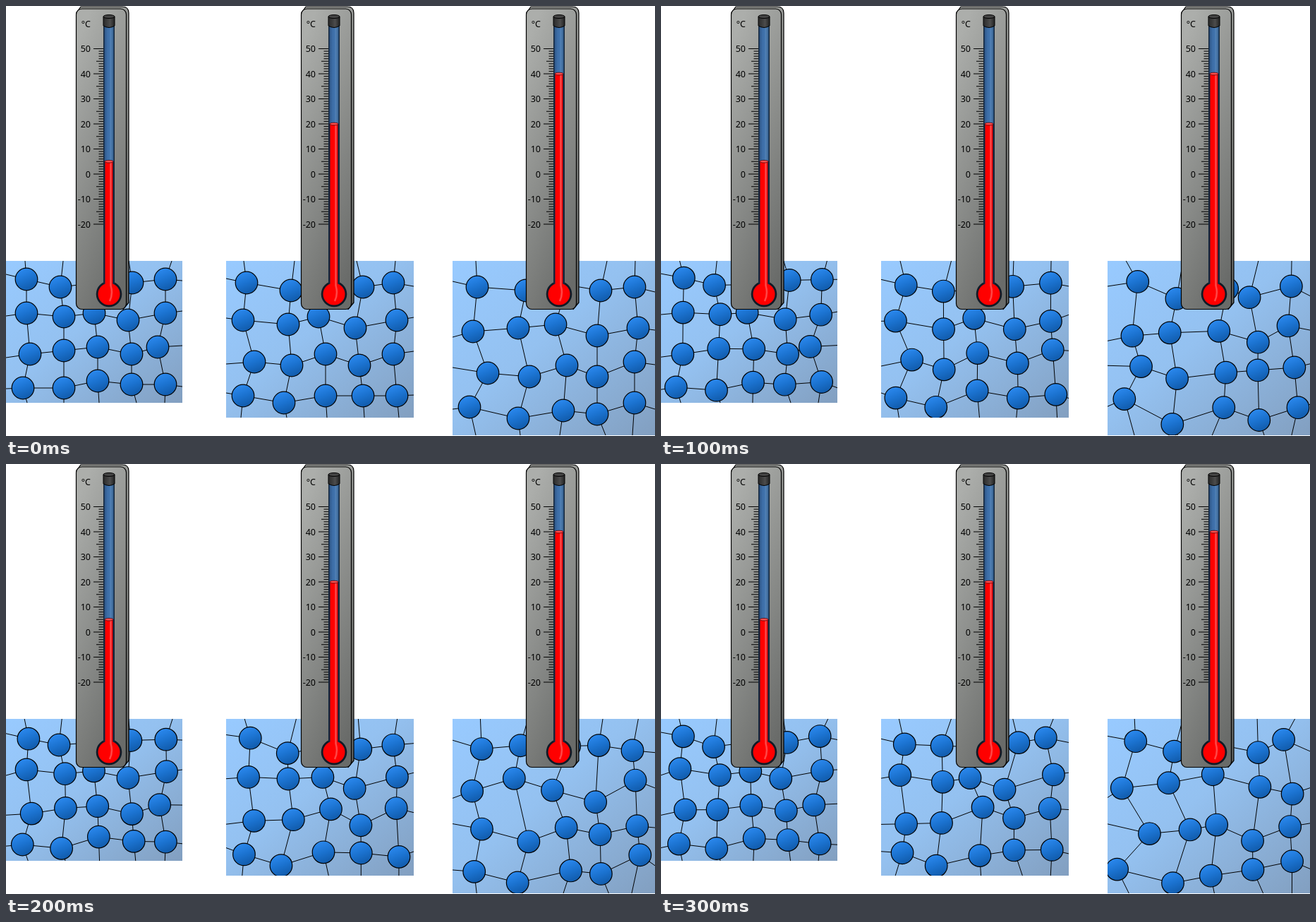
These frames come from a looping animation (920 px wide and 609 px high, 0.4 s). An HTML page:

```html
<!DOCTYPE html>
<html lang="en">
<head>
<meta charset="utf-8">
<title>Particle motion at three temperatures</title>
<style>
  html, body { margin: 0; width: 100%; height: 100%; overflow: hidden; background: #fff; }
  svg { display: block; width: 100%; height: 100%; }
  text { font: 12.5px "Noto Sans", "Open Sans", sans-serif; text-anchor: end; }
</style>
</head>
<body>
<svg id="stage" viewBox="0 0 920 609">
  <defs>
    <linearGradient id="water" x2="1" y2="1">
      <stop stop-color="#98caff"/><stop offset=".45" stop-color="#94c1f0"/><stop offset="1" stop-color="#829fc0"/>
    </linearGradient>
    <linearGradient id="ball" x1=".3" x2=".7" y2="1">
      <stop stop-color="#2c8af0"/><stop offset=".5" stop-color="#1b72cf"/><stop offset="1" stop-color="#1059a8"/>
    </linearGradient>
    <linearGradient id="plate" x1=".3" x2=".7" y2="1">
      <stop stop-color="#acaeab"/><stop offset="1" stop-color="#696b69"/>
    </linearGradient>
    <linearGradient id="side" x2="0" y2="1">
      <stop stop-color="#989a97"/><stop offset="1" stop-color="#5c5e5c"/>
    </linearGradient>
    <linearGradient id="glass">
      <stop stop-color="#2d5484"/><stop offset=".3" stop-color="#3c6ca5"/>
      <stop offset=".6" stop-color="#4174ae"/><stop offset=".65" stop-color="#5584b8"/><stop offset="1" stop-color="#34608f"/>
    </linearGradient>
    <linearGradient id="cap">
      <stop stop-color="#2a2a2a"/><stop offset=".6" stop-color="#4c4c4c"/><stop offset="1" stop-color="#222"/>
    </linearGradient>
  </defs>
</svg>
<script>
const COLS = 5, ROWS = 4, STEP = 100, POSES = 4, TOP = 361;
const stage = document.getElementById('stage');

// rest: x, y of each particle, row by row; edges: where the outer bonds leave the box
const boxes = [
  { x: 0, w: 250, h: 201, shake: 3.6, degrees: 5,
    rest: [29,387, 77,398, 128,392, 179,392, 226,387,
           29,435, 82,440, 125,435, 173,445, 226,435,
           34,493, 82,488, 130,483, 178,493, 215,483,
           24,541, 82,541, 130,531, 178,536, 226,536],
    edges: { top: [27, 81, 130, 174, 235], bottom: [30, 82, 132, 185, 225],
             left: [380, 439, 498, 542], right: [389, 432, 481, 539] } },
  { x: 312, w: 266, h: 222, shake: 8, degrees: 20,
    rest: [341,392, 404,403, 450,398, 506,398, 549,392,
           336,445, 400,451, 443,440, 495,456, 554,445,
           352,504, 405,509, 453,493, 501,509, 549,493,
           336,552, 394,562, 453,552, 506,552, 554,552],
    edges: { top: [337, 409, 450, 497, 552], bottom: [333, 398, 455, 508, 557],
             left: [386, 442, 507, 548], right: [397, 441, 489, 551] } },
  { x: 633, w: 287, h: 247, shake: 12, degrees: 40,
    rest: [668,398, 737,403, 795,395, 843,403, 891,398,
           662,461, 726,456, 779,451, 838,467, 896,456,
           683,520, 742,525, 795,509, 838,525, 891,504,
           657,568, 726,584, 790,573, 838,578, 891,562],
    edges: { top: [666, 741, 795, 852, 892], bottom: [666, 729, 785, 850, 888],
             left: [390, 469, 512, 571], right: [405, 459, 508, 571] } }
];

function random(seed) {
  return () => (seed = (seed * 16807) % 2147483647) / 2147483647;
}

function add(parent, tag, attrs, text) {
  const el = document.createElementNS('http://www.w3.org/2000/svg', tag);
  for (const key in attrs) el.setAttribute(key, attrs[key]);
  if (text) el.textContent = text;
  return parent.appendChild(el);
}

function buildBox(box, i) {
  const area = { x: box.x, y: TOP, width: box.w, height: box.h };
  add(add(stage, 'clipPath', { id: 'clip' + i }), 'rect', area);
  const g = add(stage, 'g', { 'clip-path': `url(#clip${i})`, stroke: '#000' });
  add(g, 'rect', { ...area, fill: 'url(#water)', stroke: 'none' });
  box.bonds = add(g, 'path', { fill: 'none', 'stroke-width': 1 });
  box.balls = Array.from({ length: COLS * ROWS }, () =>
    add(g, 'circle', { r: 15.8, fill: 'url(#ball)', 'stroke-width': 1.2 }));
}

function buildThermometer(degrees, dx) {
  const yOf = d => 238 - d * 3.55;
  const level = yOf(degrees);
  const g = add(stage, 'g', { transform: `translate(${dx})` });
  add(g, 'path', { d: 'M99.5 10L106 1H165Q174 1 174 10V420L166 429.5Z', fill: 'url(#side)',
    stroke: '#000', 'stroke-width': 1.2, 'stroke-linejoin': 'round' });
  add(g, 'rect', { x: 99.5, y: 4, width: 71, height: 425.5, rx: 8,
    fill: 'url(#plate)', stroke: '#000', 'stroke-width': 1.2 });

  let ticks = '';
  for (let d = -20; d <= 50; d++) {
    const start = d % 10 === 0 ? 124 : d % 5 === 0 ? 128 : 131.5;
    ticks += `M${start} ${yOf(d)}H138`;
    if (d % 10 === 0) add(g, 'text', { x: 120, y: yOf(d) + 4.7 }, String(d));
  }
  add(g, 'path', { d: ticks, stroke: '#000', 'stroke-width': 1 });
  add(g, 'text', { x: 120, y: 30 }, '°C');

  // glass tube, bulb and liquid
  add(g, 'circle', { cx: 146, cy: 408, r: 18.3, fill: '#101a26' });
  add(g, 'rect', { x: 138, y: 28, width: 16, height: 372, fill: '#14263c' });
  add(g, 'rect', { x: 139.5, y: 28, width: 13, height: level - 28, fill: 'url(#glass)' });
  add(g, 'circle', { cx: 146, cy: 408, r: 15.5, fill: '#f00' });
  add(g, 'rect', { x: 140.5, y: level, width: 10.8, height: 400 - level, fill: '#f00' });
  add(g, 'path', { d: `M148.5 ${level}V396Q152 408 147 418`, fill: 'none',
    stroke: '#ff4545', 'stroke-width': 2.6 });
  add(g, 'ellipse', { cx: 146, cy: level, rx: 6, ry: 1.8, fill: '#ff5050', stroke: '#500', 'stroke-width': .8 });

  add(g, 'path', { d: 'M138 15V28Q146 33 154 28V15Z', fill: 'url(#cap)', stroke: '#000' });
  add(g, 'ellipse', { cx: 146, cy: 15, rx: 8, ry: 2.5, fill: '#444', stroke: '#000' });
}

function drawBox(box, i, pose) {
  const next = random(1009 * (i + 1) + 7919 * pose + 5);
  for (let n = 0; n < 5; n++) next();
  const shake = pose ? box.shake : 0;
  const at = box.balls.map((ball, n) => {
    const p = [0, 1].map(axis => box.rest[2 * n + axis] + (next() * 2 - 1) * shake);
    ball.setAttribute('cx', p[0]);
    ball.setAttribute('cy', p[1]);
    return p;
  });

  const { top, bottom, left, right } = box.edges;
  const drift = v => v + (next() * 2 - 1) * shake * .6;
  let d = '';
  const line = (a, b) => { d += `M${a}L${b}`; };
  at.forEach((p, n) => {
    const c = n % COLS, r = Math.floor(n / COLS);
    line(p, c < COLS - 1 ? at[n + 1] : [box.x + box.w, drift(right[r])]);
    line(p, r < ROWS - 1 ? at[n + COLS] : [drift(bottom[c]), TOP + box.h]);
    if (c === 0) line(p, [box.x, drift(left[r])]);
    if (r === 0) line(p, [drift(top[c]), TOP]);
  });
  box.bonds.setAttribute('d', d);
}

boxes.forEach(buildBox);
boxes.forEach((box, i) => buildThermometer(box.degrees, i * 319));

const start = performance.now();
let shown = -1;
function tick() {
  const pose = Math.floor((performance.now() - start) / STEP) % POSES;
  if (pose !== shown) boxes.forEach((box, i) => drawBox(box, i, pose));
  shown = pose;
  requestAnimationFrame(tick);
}
tick();
</script>
</body>
</html>
```
